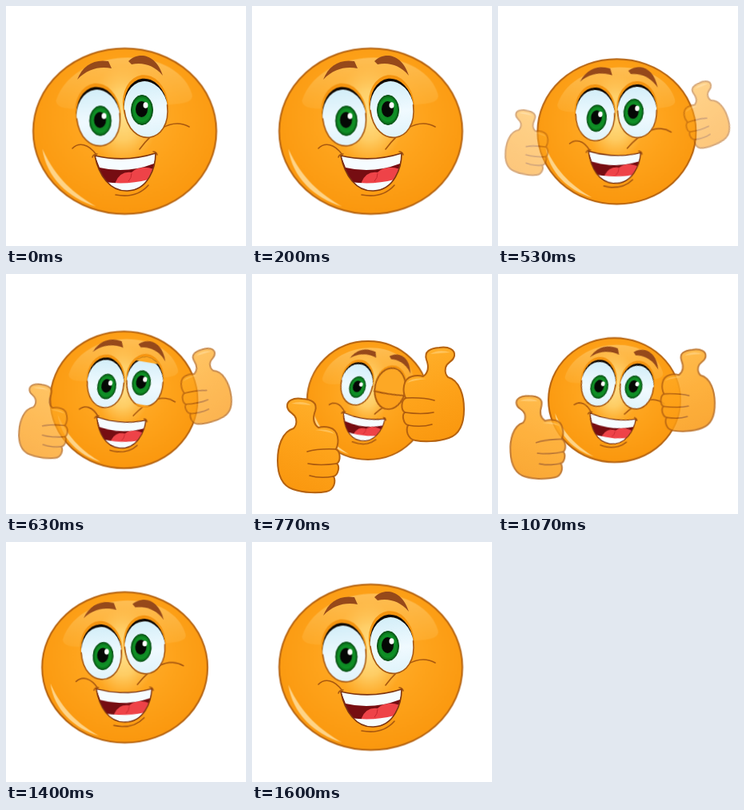
An HTML page for the animation above (2000 ms loop, 300 px wide and 300 px high).

```html
<!DOCTYPE html>
<html lang="en">
<head>
<meta charset="utf-8">
<title>Winking thumbs up</title>
<style>
html, body { margin: 0; width: 100%; height: 100%; overflow: hidden; background: #fff; }
svg { display: block; width: 100vw; height: 100vh; }
.line { fill: none; stroke: #a8580f; stroke-width: 1.6; stroke-linecap: round; stroke-linejoin: round; }
.line, .edge { vector-effect: non-scaling-stroke; }
.edge { stroke: #b5620f; stroke-width: 2; }
.move { animation: 2s linear infinite; }

#head { animation-name: head; }
#brows { animation-name: brows; fill: #96491a; }
#eyeL { animation-name: eyeL; }
#eyeR { animation-name: eyeR; }
#mouth { animation-name: mouth; }
#handL { animation-name: handL, fade; }
#handR { animation-name: handR, fade; }
#lidTop { animation-name: lidTop; }
#lidLow { animation-name: lidLow; }
#crease { animation-name: crease; }

@keyframes head {
  0%, 18.5%, 80%, 100% { transform: translate(148.5px, 156.5px) scale(1, 1); }
  26.5%, 28.5% { transform: translate(148.5px, 157px) scale(.865, .875); }
  38.5%, 46.5% { transform: translate(145px, 158px) scale(.665, .715); }
  53.5% { transform: translate(145.5px, 157.5px) scale(.72, .75); }
  61.5% { transform: translate(148.5px, 157px) scale(.82, .83); }
}
@keyframes brows {
  0%, 18.5%, 80%, 100% { transform: translate(142px, 77px) rotate(0deg) scale(1); }
  26.5%, 28.5% { transform: translate(152px, 87px) rotate(7deg) scale(.91); }
  38.5%, 46.5% { transform: translate(162.5px, 106px) rotate(17deg) scale(.73); }
  53.5% { transform: translate(159.5px, 102px) rotate(13deg) scale(.81); }
  61.5% { transform: translate(152px, 91px) rotate(7deg) scale(.88); }
}
@keyframes eyeL {
  0%, 18.5%, 80%, 100% { transform: translate(115.5px, 139.5px) rotate(0deg) scale(1); }
  26.5%, 28.5% { transform: translate(121.5px, 136.5px) rotate(6deg) scale(.9); }
  38.5%, 46.5% { transform: translate(131px, 138px) rotate(18deg) scale(.73); }
  53.5% { transform: translate(125.5px, 137.5px) rotate(14deg) scale(.79); }
  61.5% { transform: translate(122.5px, 138px) rotate(6deg) scale(.87); }
}
@keyframes eyeR {
  0%, 18.5%, 80%, 100% { transform: translate(175px, 129px) rotate(0deg) scale(1); }
  26.5%, 28.5% { transform: translate(174px, 132.5px) rotate(6deg) scale(.9); }
  38.5%, 46.5% { transform: translate(172.5px, 144px) rotate(18deg) scale(.7); }
  53.5% { transform: translate(173.5px, 141.5px) rotate(14deg) scale(.77); }
  61.5% { transform: translate(172.5px, 134px) rotate(6deg) scale(.87); }
}
@keyframes mouth {
  0%, 18.5%, 80%, 100% { transform: translate(149px, 206px) rotate(0deg) scale(1); }
  26.5%, 28.5% { transform: translate(144.5px, 200px) rotate(4deg) scale(.86); }
  38.5%, 46.5% { transform: translate(137.5px, 191px) rotate(11deg) scale(.69); }
  53.5% { transform: translate(141px, 193px) rotate(10deg) scale(.76); }
  61.5% { transform: translate(145px, 199px) rotate(4deg) scale(.84); }
}
@keyframes handL {
  0%, 18.5%, 68%, 100% { transform: translate(48px, 150px) rotate(3deg) scale(-.48, .48); }
  26.5%, 28.5% { transform: translate(36px, 182px) rotate(6deg) scale(-.68, .68); }
  38.5%, 46.5% { transform: translate(71px, 231px) rotate(0deg) scale(-1, 1); }
  53.5% { transform: translate(50px, 219px) rotate(-3deg) scale(-.89, .89); }
  61.5% { transform: translate(47px, 169px) rotate(2deg) scale(-.62, .62); }
}
@keyframes handR {
  0%, 18.5%, 68%, 100% { transform: translate(258px, 128px) rotate(-3deg) scale(.4, .4); }
  26.5%, 28.5% { transform: translate(261.5px, 146.5px) rotate(-17deg) scale(.68, .68); }
  38.5%, 46.5% { transform: translate(226px, 167px) rotate(0deg) scale(1, 1); }
  53.5% { transform: translate(237px, 160px) rotate(-1deg) scale(.87, .87); }
  61.5% { transform: translate(260px, 135px) rotate(-1deg) scale(.52, .52); }
}
@keyframes fade {
  0%, 18.5%, 67%, 100% { opacity: 0; }
  26.5%, 28.5% { opacity: .55; }
  36%, 46.5% { opacity: 1; }
  53.5% { opacity: .85; }
  61.5% { opacity: .28; }
}
@keyframes lidTop {
  0%, 30%, 52%, 100% { transform: translate(0, -42px) scaleY(0); }
  37%, 46.5% { transform: translate(0, -42px) scaleY(1); }
}
@keyframes lidLow {
  0%, 30%, 52%, 100% { transform: translate(0, 40px) scaleY(0); }
  37%, 46.5% { transform: translate(0, 40px) scaleY(1); }
}
@keyframes crease {
  0%, 34%, 48.5%, 100% { opacity: 0; }
  37%, 46.5% { opacity: 1; }
}
</style>
</head>
<body>
<svg viewBox="0 0 300 300">
  <defs>
    <radialGradient id="skin" cx=".5" cy=".42" r=".62">
      <stop offset="0" stop-color="#ffb233"/>
      <stop offset=".5" stop-color="#fea31b"/>
      <stop offset="1" stop-color="#fa960c"/>
    </radialGradient>
    <linearGradient id="shine" x2="0" y2="1">
      <stop offset="0" stop-color="#ffd684" stop-opacity=".55"/>
      <stop offset="1" stop-color="#ffcf70" stop-opacity=".15"/>
    </linearGradient>
    <radialGradient id="glow">
      <stop offset="0" stop-color="#ffe08a"/>
      <stop offset=".5" stop-color="#ffd878" stop-opacity=".75"/>
      <stop offset="1" stop-color="#ffc860" stop-opacity="0"/>
    </radialGradient>
    <linearGradient id="palm" x1=".3" x2=".6" y2="1">
      <stop offset="0" stop-color="#ffb02c"/>
      <stop offset=".5" stop-color="#fea31a"/>
      <stop offset="1" stop-color="#fa980f"/>
    </linearGradient>
    <linearGradient id="white" x2="0" y2="1">
      <stop offset="0" stop-color="#d3eef8"/>
      <stop offset=".55" stop-color="#f0faff"/>
      <stop offset="1" stop-color="#dff3fa"/>
    </linearGradient>
    <radialGradient id="green">
      <stop offset="0" stop-color="#0c6a1c"/>
      <stop offset=".75" stop-color="#0f9226"/>
      <stop offset="1" stop-color="#075a15"/>
    </radialGradient>
    <clipPath id="socket"><ellipse cy="-1" rx="27.5" ry="38" transform="rotate(-7)"/></clipPath>
    <path id="lipShape" d="M-38 -19Q1 -10 38 -22C38 -4 29 24 3 25C-19 26 -33 6 -38 -19Z"/>
    <clipPath id="lips"><use href="#lipShape"/></clipPath>

    <g id="ball" transform="rotate(-7)">
      <ellipse cy="-5" rx="28.5" ry="38" fill="#f5940f"/>
      <ellipse cy="-2.5" rx="27" ry="36" fill="#120a04"/>
      <ellipse cy=".5" rx="27.3" ry="35.5" fill="url(#white)"/>
      <path class="line" d="M-27 -2C-27 48 27 48 27 -2" stroke-width="1"/>
    </g>
    <g id="iris">
      <ellipse rx="13.5" ry="18.5" fill="url(#green)" stroke="#064b12"/>
      <ellipse cx="-.5" cy="-1" rx="7.5" ry="10" fill="#050805"/>
      <ellipse cx="4.5" cy="-6" rx="3" ry="3.8" fill="#fff"/>
    </g>
    <g id="hand">
      <path class="edge" fill="url(#palm)" d="M-12 -39C-5 -44 -5 -52 -8 -60C-11 -70 -4 -74 8 -75C20 -77 28 -72 27 -65C26 -57 18 -58 16 -50C15 -45 16 -41 19 -38C34 -34 39 -14 39 2C39 22 32 34 20 38C6 43 -12 43 -22 41C-32 39 -34 28 -31 22C-37 20 -39 9 -35 6C-40 3 -40 -9 -34 -12C-38 -20 -38 -36 -26 -39Q-19 -41 -12 -39Z"/>
      <path fill="#ffd37c" opacity=".6" d="M-3 -67Q8 -74 22 -69Q10 -68 -3 -67ZM-32 -31Q-26 -38 -8 -36Q-24 -34 -32 -31Z"/>
      <path class="line" d="M-34 -12Q-12 -13 2 -9M-35 6Q-14 9 1 6M-31 22Q-14 25 -1 21"/>
    </g>
  </defs>

  <g id="head" class="move">
    <ellipse class="edge" rx="114.5" ry="103.5" fill="url(#skin)"/>
    <path fill="url(#shine)" d="M-86 -38C-74 -76 -30 -92 4 -92C44 -92 76 -74 84 -46C88 -30 50 -34 0 -32C-50 -30 -84 -22 -86 -38Z"/>
    <ellipse cx="-2" cy="-20" rx="44" ry="62" fill="url(#glow)"/>
    <path fill="#ffe3a6" opacity=".8" d="M-103 22C-98 58 -70 84 -36 94C-62 79 -86 60 -103 22Z"/>
  </g>

  <g id="mouth" class="move">
    <path class="line" d="M-66 -28C-58 -36 -46 -34 -36 -20M18 -27C32 -46 56 -68 80 -55M-41 -17Q-40 -21 -35 -21M35 -24Q39 -24 40 -20M-12 30Q14 35 29 18"/>
    <g clip-path="url(#lips)">
      <rect x="-40" y="-25" width="80" height="55" fill="#760d12"/>
      <path fill="#ee4348" d="M-12 14Q-6 0 8 2Q18 -8 36 -2L24 24L-12 22Z"/>
      <path fill="none" stroke="#c4262e" d="M8 3Q8 9 4 13"/>
      <path fill="#f6fcff" d="M-26 14Q2 18 29 11L20 36H-24ZM-40 -24H40L36 -9Q2 4 -32 -4Z"/>
    </g>
    <use href="#lipShape" class="line" style="stroke: #7c3410"/>
  </g>

  <g id="eyeL" class="move">
    <use href="#ball"/>
    <use href="#iris" x="2.5" y="4"/>
  </g>
  <g id="eyeR" class="move">
    <use href="#ball"/>
    <use href="#iris" x="-5" y="1"/>
    <g clip-path="url(#socket)">
      <rect id="lidTop" class="move" x="-40" width="80" height="51" fill="#fda825"/>
      <rect id="lidLow" class="move" x="-40" y="-32" width="80" height="32" fill="#fb9f1b"/>
    </g>
    <g id="crease" class="move">
      <ellipse class="line" cy="-1" rx="27" ry="37" transform="rotate(-7)"/>
      <path class="line" d="M-26 12Q0 10 28 3"/>
    </g>
  </g>
  <g id="brows" class="move">
    <path d="M-53 15C-46 -3 -32 -11 -14 -8L-10 1C-24 -2 -40 1 -53 15Z"/>
    <path d="M11 -8C23 -20 45 -18 54 10C43 -3 29 -7 15 -4Z"/>
  </g>

  <use id="handL" class="move" href="#hand"/>
  <use id="handR" class="move" href="#hand"/>
</svg>
</body>
</html>
```
